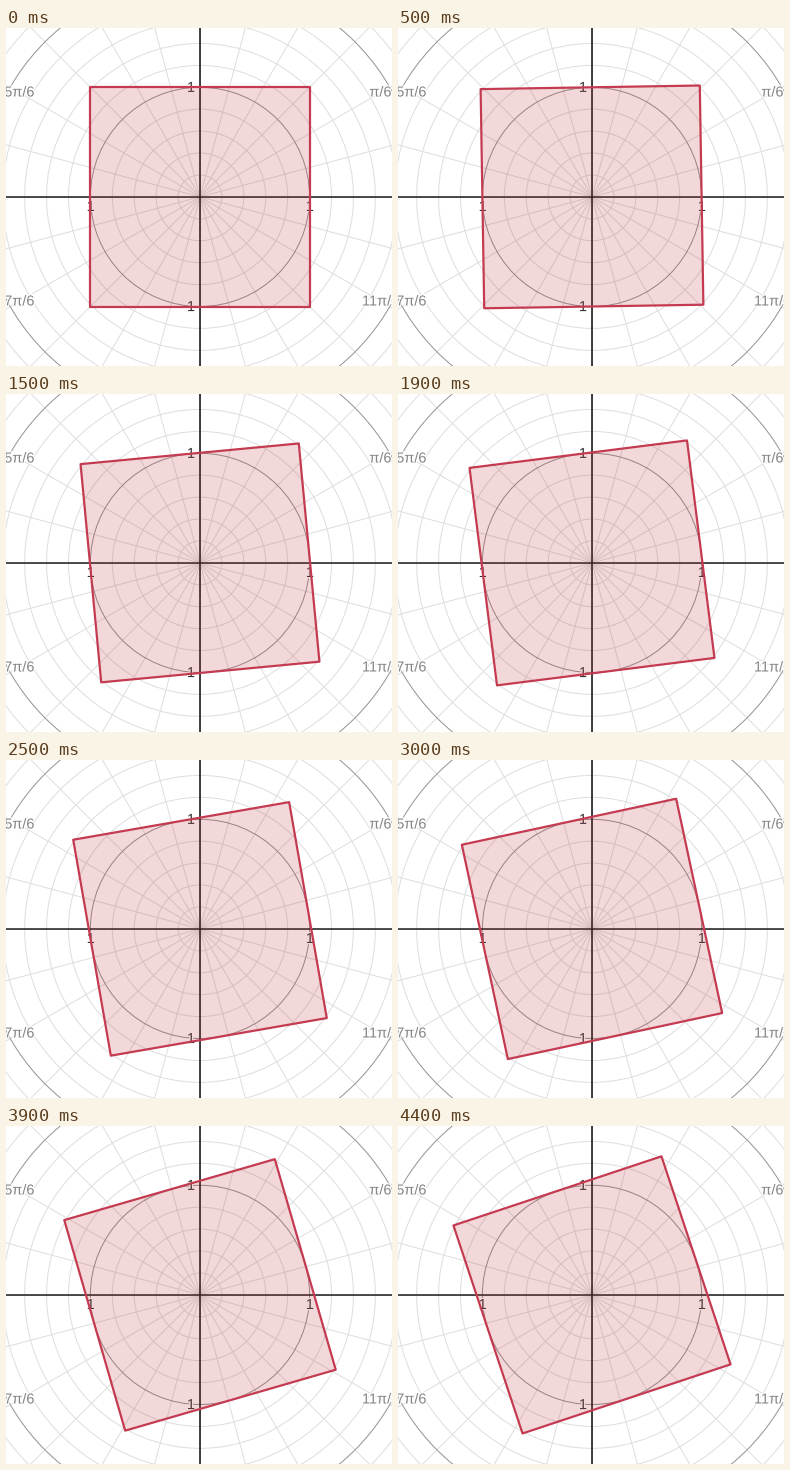
A matplotlib script for the animation above (4500 ms loop, 386 by 338 pixels).

```python
import numpy as np
import matplotlib.pyplot as plt
from matplotlib import patheffects
from matplotlib.animation import FuncAnimation
from matplotlib.patches import Circle, Polygon

W, H, DPI = 386, 338, 100
PX = 72 / DPI
CX, CY, UNIT = 194, 168.9, 109.6
FRAMES, STEP_MS = 45, 100
MINOR, MAJOR, AXIS = "#dedede", "#949494", "#161616"
EDGE, FILL = "#c43a50", (0.75, 0.235, 0.25, 0.2)

plt.rcParams["font.family"] = "Liberation Sans"
fig = plt.figure(figsize=(W / DPI, H / DPI), dpi=DPI, facecolor="white")
ax = fig.add_axes([0, 0, 1, 1])
ax.set_xlim(0, W)
ax.set_ylim(H, 0)
ax.axis("off")


def ring(radius, color, z):
    ax.add_patch(Circle((CX, CY), radius, fill=False, ec=color, lw=PX, zorder=z))


def label(x, y, text, color, ha="center"):
    halo = patheffects.withStroke(linewidth=2.5 * PX, foreground="white")
    ax.text(x, y, text, color=color, fontsize=14.5 * PX, ha=ha,
            va="baseline", zorder=4, path_effects=[halo])


def draw_grid():
    for k in range(1, 13):
        if k % 5:
            ring(k * UNIT / 5, MINOR, 1)
        else:
            ring(k * UNIT / 5, MAJOR, 2)
    for a in np.arange(0, np.pi, np.pi / 12):
        dx, dy = 300 * np.cos(a), 300 * np.sin(a)
        ax.plot([CX - dx, CX + dx], [CY - dy, CY + dy],
                color=MINOR, lw=PX, zorder=1)
    ax.plot([0, W], [CY - 0.4] * 2, color=AXIS, lw=1.5 * PX, zorder=3)
    ax.plot([CX] * 2, [0, H], color=AXIS, lw=1.6 * PX, zorder=3)


def draw_labels():
    for s in (-1, 1):
        label(CX + s * UNIT + 0.3, 183, "1", "#333333")
        label(185, CY + s * UNIT + 4.6, "1", "#333333")
    for x, y, text, ha in [(385.5, 68.5, "π/6", "right"), (28.5, 68.5, "5π/6", "right"),
                           (28.5, 277.5, "7π/6", "right"), (356, 277.5, "11π/6", "left")]:
        label(x, y, text, "#858585", ha)


def turn(n):
    """Rotation in degrees: a barely visible start, then constant speed."""
    return max(0.447 * (n - 2.9), 0.03 if n else 0)


def corners(n):
    a = np.radians(turn(n) + 45 + 90 * np.arange(4))
    r = UNIT * np.sqrt(2)
    return np.column_stack([CX + r * np.cos(a), CY - r * np.sin(a)])


draw_grid()
draw_labels()
square = ax.add_patch(Polygon(corners(0), closed=True, fc=FILL, ec=EDGE,
                              lw=2.2 * PX, joinstyle="round", zorder=5))


def update(n):
    square.set_xy(corners(n))
    return [square]


anim = FuncAnimation(fig, update, frames=FRAMES, interval=STEP_MS,
                     repeat=True, repeat_delay=0, blit=False)
plt.show()
```
